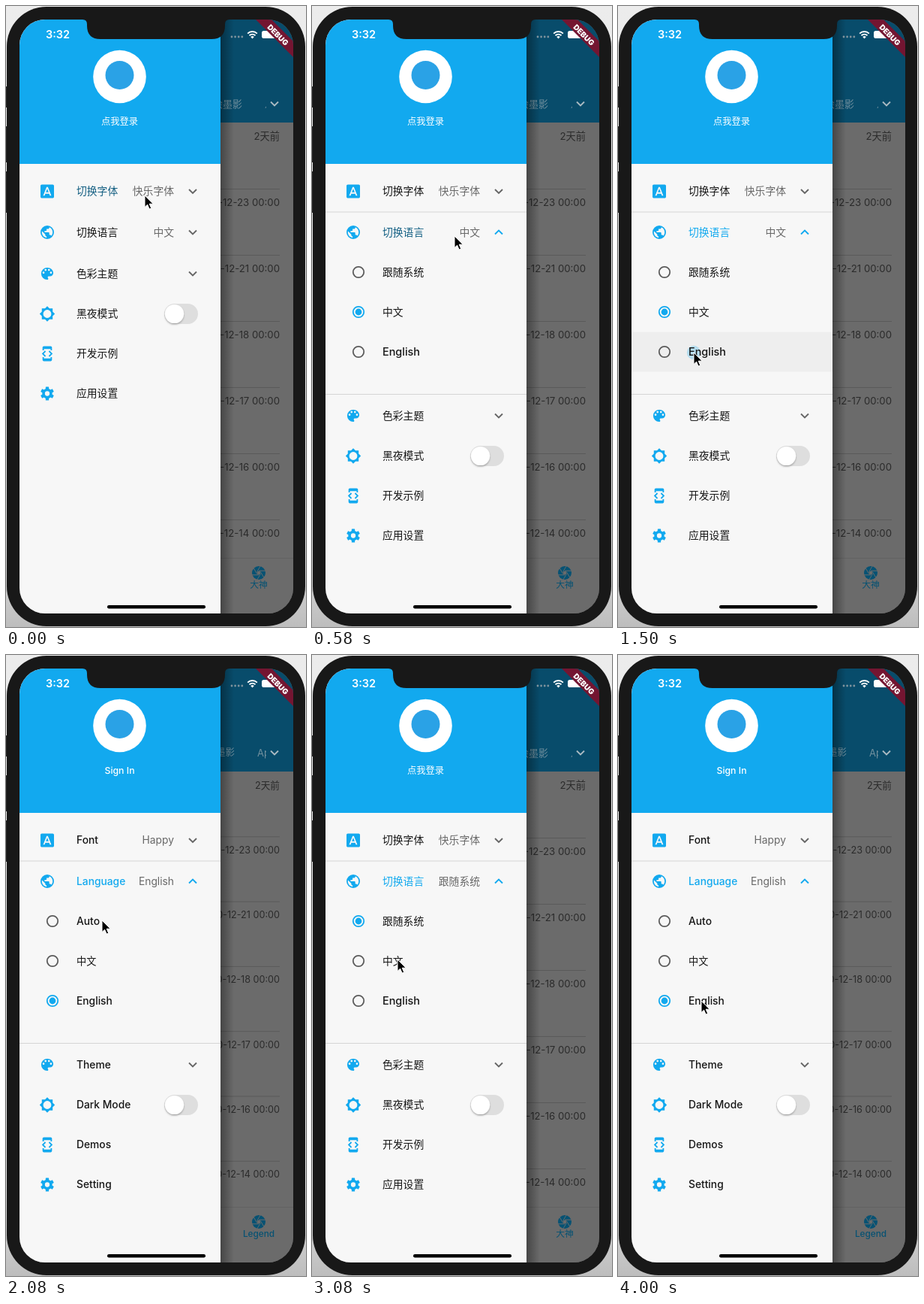
An HTML page for the animation above (4080 ms loop, 400 px wide and 826 px high).

```html
<!DOCTYPE html>
<html lang="zh-CN">
<head>
<meta charset="utf-8">
<style>
html, body { margin: 0; width: 100%; height: 100%; overflow: hidden; background: #e9e9e9; }
svg { display: block; width: 400px; height: 826px; font-family: Inter, "Noto Sans CJK SC", "Noto Sans CJK", sans-serif; }
.end { text-anchor: end; }
.mid { text-anchor: middle; }
.label { font-weight: 500; fill: #161616; }
.value { fill: #686868; }
.chevron { fill: none; stroke: #666; stroke-width: 1.9; }
</style>
</head>
<body>
<svg id="stage" viewBox="0 0 400 826"></svg>
<script>
const LOOP = 4080, BLUE = [18, 169, 239], BLUE_CSS = `rgb(${BLUE})`, DIM = '#6b6b6b';
const EXPAND = 189, OPEN_AT = 320;
const TAPS = [
  { at: 1600, press: 1430, row: 2, x: 101, y: 461 },
  { at: 2400, press: 2260, row: 0, x: 129, y: 354 },
  { at: 3230, press: 3110, row: 1, x: 115, y: 407 },
  { at: 3640, press: 3560, row: 2, x: 111, y: 461 }
];
// Times at which the language flips, starting from Chinese
const FLIPS = [1690, 2490, 3730];
const CURSOR = [
  [0, 185, 252], [290, 190, 306], [700, 190, 306], [1150, 101, 461], [1820, 101, 461],
  [2050, 128, 353], [2620, 128, 353], [3000, 114, 405], [3310, 114, 405], [3520, 111, 460], [LOOP, 111, 460]
];
const OPTIONS = [['跟随系统', 'Auto'], ['中文', '中文'], ['English', 'English']];

const clamp = v => Math.max(0, Math.min(1, v));
const ramp = (t, start, length) => clamp((t - start) / length);
const smooth = p => p * p * (3 - 2 * p);
const mix = (a, b, p) => a + (b - a) * p;
const mixColor = (a, b, p) => `rgb(${a.map((v, i) => Math.round(mix(v, b[i], p)))})`;
const list = (n, fn) => Array.from({ length: n }, (_, i) => fn(i)).join('');
const spin = (n, shape) => list(n, k => `<g transform="rotate(${k * 360 / n} 12 12)">${shape}</g>`);
const hole = (x, y) => `M${x - 1.5} ${y}a1.5 1.5 0 1 0 3 0a1.5 1.5 0 1 0-3 0z`;
const path = d => `<path fill-rule="evenodd" d="${d}"/>`;

const ICONS = {
  font: path('M9.93 13.5h4.14L12 7.98zM20 2H4c-1.1 0-2 .9-2 2v16c0 1.1.9 2 2 2h16c1.1 0 2-.9 2-2V4c0-1.1-.9-2-2-2zm-4.05 16.5l-1.14-3H9.17l-1.12 3H5.96l5.11-13h1.86l5.11 13z'),
  globe: path('M12 2a10 10 0 1 0 0 20a10 10 0 1 0 0-20zm-1 17.93c-3.95-.49-7-3.85-7-7.93 0-.62.08-1.21.21-1.79L9 15v1c0 1.1.9 2 2 2zm6.9-2.54c-.26-.81-1-1.39-1.9-1.39h-1v-3c0-.55-.45-1-1-1H8v-2h2c.55 0 1-.45 1-1V7h2c1.1 0 2-.9 2-2v-.41c2.93 1.19 5 4.06 5 7.41 0 2.08-.8 3.97-2.1 5.39z'),
  palette: path('M12 3a9 9 0 0 0 0 18c.83 0 1.5-.67 1.5-1.5 0-.39-.15-.74-.39-1.01-.23-.26-.38-.61-.38-.99 0-.83.67-1.5 1.5-1.5H16c2.76 0 5-2.24 5-5 0-4.42-4.03-8-9-8z'
    + hole(6.5, 10.5) + hole(9.5, 6.5) + hole(14.5, 6.5) + hole(17.5, 10.5)),
  sun: path('M20 15.31L23.31 12 20 8.69V4h-4.69L12 .69 8.69 4H4v4.69L.69 12 4 15.31V20h4.69L12 23.31 15.31 20H20zM12 18a6 6 0 1 1 0-12a6 6 0 1 1 0 12z'),
  code: path('M7 5h10v2h2V3c0-1.1-.9-2-2-2H7c-1.1 0-2 .9-2 2v4h2zm8.41 11.59L20 12l-4.59-4.59L14 8.83 17.17 12 14 15.17zM10 15.17L6.83 12 10 8.83 8.59 7.41 4 12l4.59 4.59zM17 19H7v-2H5v4c0 1.1.9 2 2 2h10c1.1 0 2-.9 2-2v-4h-2z'),
  gear: `<circle cx="12" cy="12" r="5.5" fill="none" stroke="${BLUE_CSS}" stroke-width="4"/>`
    + spin(6, '<rect x="9.6" y="2" width="4.8" height="4" rx=".6"/>'),
  aperture: '<circle cx="12" cy="12" r="10"/>' + spin(6, `<path d="M9.4 10.5L14.8 1.1" stroke="${DIM}"/>`)
    + `<circle cx="12" cy="12" r="2.6" fill="${DIM}"/>`
};
const icon = (name, x, y, color = BLUE_CSS) =>
  `<g fill="${color}" transform="translate(${x - 10.8} ${y - 10.8}) scale(.9)">${ICONS[name]}</g>`;

// Bilingual text; its string and size follow the current language
const text = (x, y, zh, en = zh, cls = 'label', size = 13.8, extra = '') =>
  `<text x="${x}" y="${y}" dy=".36em" class="${cls}" data-zh="${zh}" data-en="${en}" data-size="${size}" ${extra}></text>`;
const chevron = (x, y, id, extra = '') =>
  `<path id="${id}" class="chevron" d="M${x - 5} ${y - 2.5}l5 5l5-5" ${extra}/>`;
const row = (name, y, zh, en, extra) => icon(name, 55, y) + text(94, y, zh, en, 'label', 13.8, extra);
const line = (id, y) => `<rect id="${id}" x="18" y="${y}" width="268" height="1" fill="#d5d5d5"/>`;

const stage = document.getElementById('stage');
stage.innerHTML = `
<defs>
  <clipPath id="screen"><rect x="18" y="18" width="365" height="790" rx="34"/></clipPath>
  <clipPath id="tabs"><rect x="286" y="110" width="61" height="40"/></clipPath>
  <clipPath id="reveal"><rect id="revealBox" x="18" y="328" width="268" height="0"/></clipPath>
  <clipPath id="inkRow"><rect id="inkBox" x="18" width="268" height="53"/></clipPath>
  <linearGradient id="floor" x2="0" y2="1">
    <stop offset="0" stop-color="#ececec"/><stop offset=".85" stop-color="#e4e4e4"/><stop offset="1" stop-color="#bdbdbd"/>
  </linearGradient>
  <linearGradient id="shade"><stop stop-opacity=".35"/><stop offset="1" stop-opacity="0"/></linearGradient>
  <filter id="soft" x="-50%" y="-50%" width="200%" height="200%"><feDropShadow dx="0" dy="1.5" stdDeviation="1.3" flood-opacity=".3"/></filter>
</defs>
<rect width="400" height="826" fill="url(#floor)"/>
<path d="M0 107h2v28H0zM0 160h2v48H0zM0 220h2v55H0z" fill="#222"/>
<rect x="1" y="1" width="398" height="824" rx="53" fill="#181818"/>
<g clip-path="url(#screen)">
  <rect x="18" y="18" width="365" height="790" fill="${DIM}"/>
  <rect x="286" y="18" width="97" height="137" fill="#084c6b"/>
  <g clip-path="url(#tabs)">
    <g id="tabZh">${text(315, 130, '绘墨影', '绘墨影', 'end', 13, 'fill="#71909e"')}${text(345, 130, '八', '八', '', 13, 'fill="#71909e"')}</g>
    <g id="tabEn">${text(305, 130, '绘墨影', '绘墨影', 'end', 13, 'fill="#71909e"')}${text(335, 130, 'App', 'App', '', 13, 'fill="#71909e"')}</g>
  </g>
  ${chevron(358, 130, 'tabArrow', 'style="stroke:#a9b9c1"')}
  ${text(365, 173, '2天前', '2天前', 'end', 13.2, 'fill="#2b2b2b"')}
  ${[23, 21, 18, 17, 16, 14].map(day => `<g class="post">
    <rect x="286" y="155" width="79" height="1" fill="#5a5a5a"/>
    ${text(365, 173, `2020-12-${day} 00:00`, undefined, 'end', 13.2, 'fill="#2b2b2b"')}</g>`).join('')}
  <rect x="286" y="734" width="97" height="74" fill="${DIM}"/>
  <rect x="286" y="734" width="97" height="1" fill="#626262"/>
  ${icon('aperture', 337, 754, '#075273')}
  ${text(337, 770, '大神', 'Legend', 'mid', 11.8, 'fill="#075273" font-weight="500"')}
  <rect x="286" y="18" width="18" height="790" fill="url(#shade)"/>

  <rect x="18" y="18" width="268" height="790" fill="#f7f7f7"/>
  <rect x="18" y="18" width="268" height="192" fill="${BLUE_CSS}"/>
  <circle cx="151.5" cy="94" r="35.3" fill="#fff"/>
  <circle cx="151.5" cy="92" r="19" fill="#2aa2e6"/>
  ${text(151.5, 154, '点我登录', 'Sign In', 'mid', 12.3, 'fill="#fff" font-weight="500"')}

  ${row('font', 246.5, '切换字体', 'Font', 'id="fontLabel"')}
  ${text(224, 246.5, '快乐字体', 'Happy', 'value end')}
  ${chevron(249, 246.5, 'fontArrow')}
  ${line('topLine', 273.5)}
  ${row('globe', 301, '切换语言', 'Language', 'id="langLabel"')}
  ${text(224, 301, '', '', 'value end', 13.8, 'id="choice"')}
  ${chevron(249, 301, 'langArrow')}
  <g clip-path="url(#reveal)"><g id="options">
    <rect id="press" x="18" width="268" height="53" fill="#000"/>
    <g clip-path="url(#inkRow)"><circle id="ink" fill="${BLUE_CSS}"/></g>
    ${OPTIONS.map(([zh, en], i) => `<g class="radio">
      <circle cx="62" cy="${354 + 53 * i}" r="7.2" fill="none" stroke-width="1.8"/>
      <circle cx="62" cy="${354 + 53 * i}" r="0"/></g>
      ${text(94, 354 + 53 * i, zh, en)}`).join('')}
  </g></g>
  <g id="below">
    ${line('bottomLine', 327)}
    ${row('palette', 356, '色彩主题', 'Theme')}
    ${chevron(249, 356, 'themeArrow')}
    ${row('sun', 409.5, '黑夜模式', 'Dark Mode')}
    <rect x="211" y="396" width="45" height="27" rx="13.5" fill="#dedede"/>
    <circle cx="224.5" cy="409.5" r="12.6" fill="#fff" filter="url(#soft)"/>
    ${row('code', 462.5, '开发示例', 'Demos')}
    ${row('gear', 515.5, '应用设置', 'Setting')}
  </g>

  <text x="53" y="43" font-size="14.5" font-weight="600" fill="#fff">3:32</text>
  <g fill="#7f939d">${list(4, i => `<circle cx="${301 + i * 4.6}" cy="41" r="1.4"/>`)}</g>
  <g fill="none" stroke="#fff" stroke-width="2"><path d="M322.2 36.6a9 9 0 0 1 12.6 0M324.5 39.3a6 6 0 0 1 8 0"/></g>
  <path d="M326.2 41a3.5 3.5 0 0 1 4.6 0l-2.3 2.5z" fill="#fff"/>
  <rect x="341" y="33" width="20" height="10" rx="2.8" fill="#fff"/>
  <path d="M333 18h21l29 29v21z" fill="#741531"/>
  <text class="mid" transform="translate(362.5 38.5) rotate(45)" dy=".36em" font-size="10" font-weight="900" fill="#fff">DEBUG</text>
</g>
<path d="M102 17v1q6 0 6 6v2q0 18 18 18h148q18 0 18-18v-2q0-6 6-6v-1z" fill="#181818"/>
<rect x="135" y="797" width="131" height="4.5" rx="2.2" fill="#000"/>
<path id="cursor" d="M0 0v15.5l3.6-3.3 2.5 5.8 2.6-1.1-2.5-5.7h5z" fill="#000" stroke="#fff" stroke-width="1"/>`;

const $ = id => document.getElementById(id);
const set = (el, attrs) => Object.entries(attrs).forEach(([k, v]) => el.setAttribute(k, v));
const texts = [...stage.querySelectorAll('[data-size]')];
const posts = [...stage.querySelectorAll('.post')];
const radios = [...stage.querySelectorAll('.radio')];

function drawTexts(english, shrink) {
  for (const el of texts) {
    const value = english ? el.dataset.en : el.dataset.zh;
    const latin = /^[A-Z]/.test(value) ? 1.045 : 1;
    if (el.textContent !== value) el.textContent = value;
    el.setAttribute('font-size', el.dataset.size * latin * mix(1, .957, shrink));
  }
}

function drawExpansion(t) {
  const open = ramp(t, OPEN_AT, 200) ** 1.7, dy = EXPAND * open;
  set($('below'), { transform: `translate(0 ${dy})` });
  set($('revealBox'), { height: dy });
  set($('options'), { transform: `translate(0 ${(dy - EXPAND) / 2})` });
  set($('topLine'), { opacity: open });
  set($('bottomLine'), { opacity: open });
  set($('langArrow'), { transform: `rotate(${-180 * open} 249 301)` });
  $('langArrow').style.stroke = mixColor([102, 102, 102], BLUE, open);
  $('langLabel').style.fill = mixColor([22, 22, 22], BLUE, ramp(t, 480, 200));
  $('fontLabel').style.fill = mixColor([22, 22, 22], BLUE, .5 * (1 - ramp(t, 0, 110)));
}

function drawRadios(t) {
  const on = [0, 1, 0];
  let selected = 1;
  for (const tap of TAPS) {
    const p = ramp(t, tap.at, 200);
    on[selected] -= p;
    on[tap.row] += p;
    selected = tap.row;
  }
  radios.forEach((radio, i) => {
    const [ring, dot] = radio.children, color = mixColor([92, 92, 92], BLUE, on[i]);
    set(ring, { stroke: color });
    set(dot, { fill: color, r: 4.4 * on[i] });
  });
}

function drawInk(t) {
  const tap = TAPS.findLast(tap => t >= tap.press) || TAPS[0];
  const held = ramp(t, tap.press, 200), released = ramp(t, tap.at, 200);
  const top = 327.5 + 53 * tap.row;
  const alpha = mix(.26, .06, ramp(t, tap.at, 80)) * (1 - ramp(t, tap.at + 120, 160));
  set($('inkBox'), { y: top });
  set($('ink'), { cx: tap.x, cy: tap.y, r: 6 + 9 * held + 250 * released, opacity: t >= tap.press ? alpha : 0 });
  set($('press'), { y: top, opacity: .035 * ramp(t, tap.press, 60) * (1 - ramp(t, tap.at, 90)) });
}

function drawCursor(t) {
  const i = CURSOR.findLastIndex(k => t >= k[0]), [t0, x0, y0] = CURSOR[i];
  const [t1, x1, y1] = CURSOR[i + 1];
  const p = smooth(ramp(t, t0, t1 - t0));
  set($('cursor'), { transform: `translate(${mix(x0, x1, p)} ${mix(y0, y1, p)})` });
}

function draw(t) {
  const english = FLIPS.filter(at => t >= at).length % 2 === 1;
  const shrink = FLIPS.reduce((sum, at, i) => sum + (i % 2 ? -1 : 1) * smooth(ramp(t, at, 200)), 0);
  const choice = TAPS.findLast(tap => t >= tap.at + 90)?.row ?? 1;
  [$('choice').dataset.zh, $('choice').dataset.en] = OPTIONS[choice];
  drawTexts(english, shrink);
  posts.forEach((post, i) => set(post, { transform: `translate(0 ${(i + 1) * mix(88, 86.3, shrink)})` }));
  set($('tabZh'), { opacity: english ? 0 : 1 });
  set($('tabEn'), { opacity: english ? 1 : 0 });
  drawExpansion(t);
  drawRadios(t);
  drawInk(t);
  drawCursor(t);
}

function tick() {
  draw(performance.now() % LOOP);
  requestAnimationFrame(tick);
}
tick();
</script>
</body>
</html>
```
